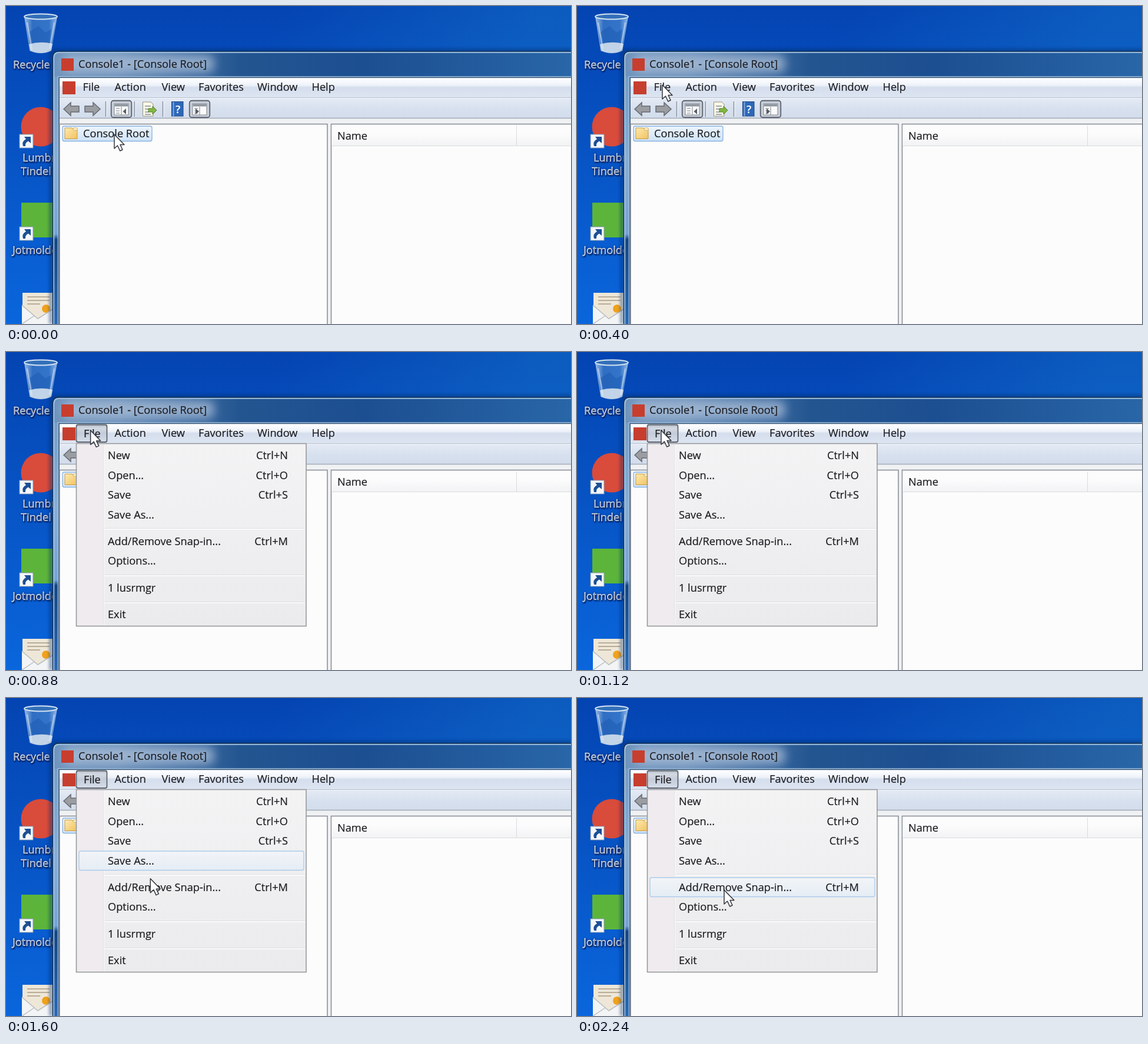
Write an HTML page that moves like this. It is 960x540 px and loops after 2.32 s.

```html
<!DOCTYPE html>
<html lang="en">
<head>
<meta charset="utf-8">
<title>Console window</title>
<style>
  html, body { margin: 0; width: 100%; height: 100%; overflow: hidden; background: #0750bd; }
  svg { display: block; width: 960px; height: 540px; }
  text { font: 18.2px "Open Sans", "Noto Sans", sans-serif; fill: #1c1c20; stroke: #1c1c20; stroke-width: .2px; white-space: pre; }
  .label text { fill: #fff; stroke: #fff; stroke-width: .35px; text-shadow: 1px 2px 2px #001a50, 0 0 3px #012a70; }
  .end { text-anchor: end; }
</style>
</head>
<body>
<svg viewBox="0 0 960 540">
  <defs>
    <linearGradient id="sky" x1="0" y1="0" x2="0" y2="1">
      <stop offset="0" stop-color="#0444b2"/><stop offset=".45" stop-color="#0753c4"/>
      <stop offset="1" stop-color="#0a66dc"/>
    </linearGradient>
    <linearGradient id="beam" gradientUnits="userSpaceOnUse" x1="480" y1="0" x2="800" y2="200">
      <stop offset="0" stop-color="#1473cc" stop-opacity="0"/>
      <stop offset="1" stop-color="#1473cc" stop-opacity=".5"/>
    </linearGradient>
    <linearGradient id="glass" x1="0" x2="1" y1="0" y2="0">
      <stop offset="0" stop-color="#6f94bd"/><stop offset=".12" stop-color="#6b8fb9"/>
      <stop offset=".36" stop-color="#235590"/><stop offset=".6" stop-color="#1c4f91"/>
      <stop offset="1" stop-color="#2866a8"/>
    </linearGradient>
    <linearGradient id="side" x1="0" x2="0" y1="0" y2="1">
      <stop offset="0" stop-color="#7399c2"/><stop offset=".4" stop-color="#86add6"/>
      <stop offset=".67" stop-color="#76a3d5"/><stop offset=".69" stop-color="#174783"/>
      <stop offset="1" stop-color="#2b69b5"/>
    </linearGradient>
    <linearGradient id="bar" x1="0" x2="0" y1="0" y2="1">
      <stop offset="0" stop-color="#fff"/><stop offset=".38" stop-color="#edf2f9"/>
      <stop offset=".48" stop-color="#d5deed"/><stop offset="1" stop-color="#dde5f2"/>
    </linearGradient>
    <linearGradient id="tools" x1="0" x2="0" y1="0" y2="1">
      <stop offset="0" stop-color="#e5ebf5"/><stop offset=".5" stop-color="#d8e1ef"/>
      <stop offset="1" stop-color="#d2dceb"/>
    </linearGradient>
    <linearGradient id="head" x1="0" x2="0" y1="0" y2="1">
      <stop offset=".4" stop-color="#fcfcfc"/><stop offset="1" stop-color="#f2f3f5"/>
    </linearGradient>
    <linearGradient id="pick" x1="0" x2="0" y1="0" y2="1">
      <stop offset="0" stop-color="#edf5fd"/><stop offset="1" stop-color="#cfe3f8"/>
    </linearGradient>
    <linearGradient id="hover" x1="0" x2="0" y1="0" y2="1">
      <stop offset="0" stop-color="#f2f4f7"/><stop offset="1" stop-color="#e5edf5"/>
    </linearGradient>
    <linearGradient id="press" x1="0" x2="0" y1="0" y2="1">
      <stop offset="0" stop-color="#b9c0cb"/><stop offset=".2" stop-color="#d3d9e2"/>
      <stop offset=".5" stop-color="#c4ccd9"/><stop offset="1" stop-color="#d6deea"/>
    </linearGradient>
    <linearGradient id="sheet" x1="0" x2="0" y1="0" y2="1">
      <stop offset="0" stop-color="#f3f3f4"/><stop offset="1" stop-color="#ebebed"/>
    </linearGradient>
    <linearGradient id="folder" x1="0" x2="1" y1="0" y2="1">
      <stop offset="0" stop-color="#fdeab0"/><stop offset="1" stop-color="#f1c25f"/>
    </linearGradient>
    <linearGradient id="bin" x1="0" x2="1" y1="0" y2="0">
      <stop offset="0" stop-color="#b9d4f0" stop-opacity=".85"/><stop offset=".25" stop-color="#3b78c6" stop-opacity=".8"/>
      <stop offset=".75" stop-color="#3f80cf" stop-opacity=".8"/><stop offset="1" stop-color="#b5d0ee" stop-opacity=".85"/>
    </linearGradient>
    <filter id="soft" x="-20%" y="-100%" width="140%" height="300%"><feGaussianBlur stdDeviation="8"/></filter>
    <filter id="blur"><feGaussianBlur stdDeviation="2.5"/></filter>
    <clipPath id="title"><path d="M81 120V87q0-8 8-8H960V120z"/></clipPath>
    <g id="link">
      <rect width="23" height="23" fill="#f4f7fb" stroke="#8799b0"/>
      <path d="M6 20Q3 12 11 8L8 4H19V15L15 11.500Q9 14 10 20z" fill="#1c4f94"/>
    </g>
    <path id="arrow" d="M0 0L12-11V-5H26V5H12V11z" fill="#9a9da2" stroke="#686b70" stroke-width="1.500"/>
    <g id="pane">
      <rect x=".75" y=".75" width="34.500" height="28.500" rx="4" fill="#c9d0db" stroke="#5d636d" stroke-width="1.800"/>
      <rect x="6" y="6" width="24" height="19" fill="#fafafa" stroke="#7d838b"/>
      <path d="M6.500 8.500H29.500" stroke="#8f969f" stroke-width="4"/>
      <path d="M9 14H15M9 18H15M9 22H15" stroke="#a1a7ae" stroke-width="1.500"/>
      <path d="M18 11V25" stroke="#7d838b"/>
    </g>
  </defs>

  <rect width="960" height="540" fill="url(#sky)"/>
  <rect x="400" width="560" height="80" fill="url(#beam)"/>

  <g>
    <path d="M31 18L40 76Q59 85 77 76L87 18z" fill="url(#bin)"/>
    <path d="M40 44L55 34 67 45 77 39 73 64 46 65z" fill="#1c5bb2" opacity=".55"/>
    <path d="M39 65Q58 59 79 64L77 76Q59 84 41 76z" fill="#dce6ee" opacity=".85"/>
    <path d="M36 28L44 74M82 28L74 74" stroke="#e4f0fb" stroke-width="2" opacity=".55"/>
    <ellipse cx="59" cy="18" rx="28" ry="4.500" fill="#336fb9" stroke="#d5e4f2" stroke-width="2"/>
  </g>
  <circle cx="59" cy="205" r="33.500" fill="#d94b3b"/>
  <use href="#link" x="23" y="218"/>
  <rect x="26" y="334" width="56" height="59" fill="#5cb53a"/>
  <use href="#link" x="23" y="375"/>
  <g>
    <path d="M28 487H84V540H28z" fill="#eee7d8"/>
    <path d="M36 494H74M36 500H74M36 506H58" stroke="#b9ad98" stroke-width="2"/>
    <circle cx="68" cy="514" r="7" fill="#f0a21c"/>
    <path d="M27 508L54 531 84 512V540H27z" fill="#f3f4f5"/>
    <path d="M27 508L54 531 84 512M27 540L48 526" fill="none" stroke="#b9bdc2" stroke-width="1.500"/>
  </g>
  <g class="label">
    <text x="12" y="106">Recycle</text>
    <text x="28" y="264">Lumbro</text>
    <text x="25" y="287">Tindel</text>
    <text x="11" y="421">Jotmolder</text>
  </g>

  <path d="M76 540V85q0-10 10-10H960" fill="none" stroke="#022a68" stroke-width="5" opacity=".5" filter="url(#blur)"/>
  <path d="M79 540V87q0-10 10-10H960V540z" fill="url(#side)"/>
  <g clip-path="url(#title)">
    <rect x="80" y="77" width="880" height="45" fill="url(#glass)"/>
    <rect x="96" y="83" width="258" height="30" rx="12" fill="#b0c3da" opacity=".72" filter="url(#soft)"/>
  </g>
  <path d="M79.500 540V87q0-10 10-10H960" fill="none" stroke="#142f50" stroke-width="1.600"/>
  <path d="M81.300 540V88q0-9 9-9H960" fill="none" stroke="#a9cbea" stroke-width="1.600"/>
  <path d="M88.500 540V120H960" fill="none" stroke="#a4c4e3" stroke-width="1.500"/>
  <path d="M90 540V121.500H960" fill="none" stroke="#34506f" stroke-width="1.500"/>
  <rect x="94" y="89" width="21" height="21" fill="#c73e2e"/>
  <text x="123" y="104.500">Console1 - [Console Root]</text>

  <rect x="91" y="122.500" width="869" height="418" fill="#f0f1f3"/>
  <rect x="91" y="122.500" width="869" height="32.500" fill="url(#bar)"/>
  <rect x="91" y="156" width="869" height="34" fill="url(#tools)"/>
  <path d="M91 155.500H960" stroke="#b5becd"/>
  <path d="M91 156.500H960" stroke="#f4f7fb"/>
  <path d="M91 190.500H960" stroke="#a3abb8" stroke-width="1.500"/>
  <rect x="96" y="128" width="22" height="22" fill="#c73e2e"/>

  <use href="#arrow" x="98" y="175"/>
  <use href="#arrow" transform="translate(160 175) scale(-1 1)"/>
  <path d="M169.500 162V188M218.500 162V188M266.500 162V188" stroke="#868d98" stroke-width="1.500"/>
  <path d="M171 162V188M220 162V188M268 162V188" stroke="#f5f8fc"/>
  <use href="#pane" x="178" y="160"/>
  <path d="M204 174V184L198.500 179z" fill="#555b63"/>
  <use href="#pane" x="311" y="160"/>
  <path d="M322 174V184L328 179z" fill="#555b63"/>
  <path d="M232.500 163H246L250 167V187H232.500z" fill="#fbf8e6" stroke="#93907f"/>
  <path d="M236 170H246M236 175H243M236 180H243M236 184H246" stroke="#8490a3" stroke-width="1.500"/>
  <path d="M242 174H249V170L256 177 249 184V180H242z" fill="#82b644" stroke="#577f2b"/>
  <rect x="281.500" y="162.500" width="19.500" height="24.500" fill="#2d68b8" stroke="#1e4684"/>
  <path d="M284.500 163V187" stroke="#7ca7df" stroke-width="2"/>
  <text x="288" y="182" style="fill:#fff;stroke:#fff;font-weight:600">?</text>

  <path d="M91 540V200.500H546V540" fill="#fcfcfc" stroke="#858a93" stroke-width="1.500"/>
  <path d="M552.500 540V200.500H961V540" fill="#fcfcfc" stroke="#858a93" stroke-width="1.500"/>
  <rect x="553.500" y="202" width="407" height="35" fill="url(#head)"/>
  <path d="M554 237.500H960M867.500 203V237" stroke="#d9dbde"/>
  <text x="563" y="227">Name</text>
  <rect x="96" y="204" width="152" height="25.500" rx="3" fill="url(#pick)" stroke="#86b2df" stroke-width="1.300"/>
  <path d="M100 207H112L114 209H121V225.500H100z" fill="url(#folder)" stroke="#c69a45"/>
  <path d="M114 207H121V211H115z" fill="#fff6d6" stroke="#d8b261"/>
  <text x="131" y="223">Console Root</text>

  <rect id="fileHot" x="119.500" y="123.500" width="52" height="30" rx="3" fill="url(#pick)" stroke="#a9c5e4" stroke-width="1.200"/>
  <rect id="fileDown" x="119.500" y="123.500" width="52" height="29.500" rx="3" fill="url(#press)" stroke="#5e646e" stroke-width="1.800"/>
  <g id="bar-items"></g>

  <g id="opening">
    <path d="M119 154.500H510V465.500H119z" fill="#fcfcfc"/>
    <path d="M510 154.500V465.500H119" fill="none" stroke="#111" stroke-width="1.500"/>
    <path d="M119 154.500H224V264.500H119z" fill="url(#sheet)"/>
    <path d="M224 154.500V264.500H119" fill="none" stroke="#8f8f91" stroke-width="1.500"/>
    <path d="M119 177.500H222M119 222H222" stroke="#dcdee1"/>
    <path d="M119 178.700H222M119 223.200H222" stroke="#fff" stroke-width="1.400"/>
  </g>
  <g id="menu">
    <rect x="119.500" y="155.500" width="390.500" height="310" fill="url(#sheet)" stroke="#939496" stroke-width="1.500"/>
    <rect x="121" y="157" width="44" height="307" fill="#efebef"/>
    <path d="M165.500 158V464" stroke="#e5e4e6"/>
    <path d="M167 158V464" stroke="#f8f8f8"/>
    <path d="M168 299.500H508M168 378.500H508M168 424.500H508" stroke="#dcdddf"/>
    <path d="M168 300.800H508M168 379.800H508M168 425.800H508" stroke="#fff" stroke-width="1.400"/>
    <rect id="row" x="124" width="382" height="32.500" rx="3" fill="url(#hover)" stroke="#abcbea" stroke-width="1.300"/>
    <g id="items"></g>
  </g>
  <path id="cursor" d="M0 0V24L5.500 19 9.700 28 14 26 10 17.500H17z" fill="#fff" stroke="#33363d" stroke-width="1.500" stroke-linejoin="round"/>
</svg>
<script>
const LOOP = 2320, STEP = 80, OPEN = 640;
const $ = id => document.getElementById(id);

// time, x, y of the pointer tip
const path = [[0, 184, 218], [400, 145, 134], [1120, 143, 133], [1440, 236, 268], [1680, 250, 326], [LOOP, 250, 326]];

// label, row centre, shortcut
const rows = [
  ["New", 175, "Ctrl+N"], ["Open...", 209, "Ctrl+O"], ["Save", 242, "Ctrl+S"], ["Save As...", 276],
  ["Add/Remove Snap-in...", 321, "Ctrl+M"], ["Options...", 354], ["1 lusrmgr", 400], ["Exit", 445]
];
const bar = [["File", 130.5], ["Action", 184.5], ["View", 264.5], ["Favorites", 327], ["Window", 427], ["Help", 519.5]];

function addText(parent, label, x, y, cls = "") {
  const el = document.createElementNS("http://www.w3.org/2000/svg", "text");
  el.setAttribute("x", x);
  el.setAttribute("y", y);
  el.setAttribute("class", cls);
  el.textContent = label;
  parent.append(el);
  return el;
}

const [fileText] = bar.map(([label, x]) => addText($("bar-items"), label, x, 144));
for (const [label, y, keys] of rows) {
  addText($("items"), label, 173, y + 6.5);
  if (keys) addText($("items"), keys, 479, y + 6.5, "end");
}

function pointer(t) {
  const i = Math.max(1, path.findIndex(p => p[0] >= t));
  const [t0, x0, y0] = path[i - 1], [t1, x1, y1] = path[i];
  const k = Math.max(0, (t - t0) / (t1 - t0));
  return [x0 + (x1 - x0) * k, y0 + (y1 - y0) * k];
}

const show = (id, on) => $(id).style.display = on ? "" : "none";

function draw(t) {
  const [x, y] = pointer(t);
  $("cursor").setAttribute("transform", `translate(${x} ${y})`);

  const down = t >= OPEN;
  show("fileHot", t >= 480 && !down);
  show("fileDown", down);
  fileText.setAttribute("transform", down ? "translate(1.5 1)" : "");
  show("opening", down && t < OPEN + STEP);
  show("menu", t >= OPEN + STEP);

  // The highlight trails the pointer by one step.
  const lagY = pointer(t - STEP)[1];
  const hit = rows.find(r => Math.abs(r[1] - lagY) <= 16.8);
  show("row", hit);
  if (hit) $("row").setAttribute("y", hit[1] - 16);
}

const start = performance.now();
function tick() {
  const t = (performance.now() - start) % LOOP;
  draw(Math.floor(t / STEP) * STEP);
  requestAnimationFrame(tick);
}
tick();
</script>
</body>
</html>
```
